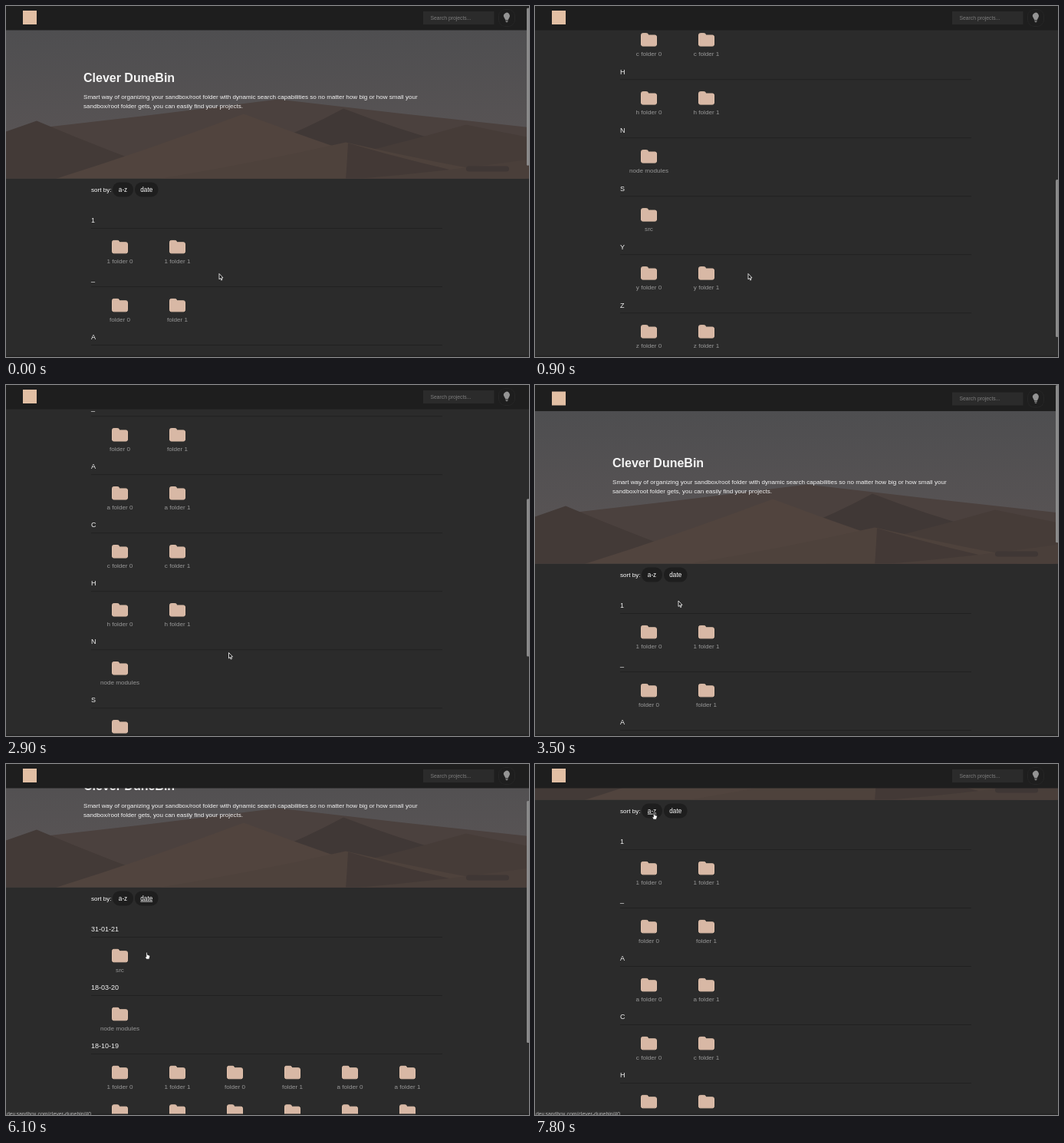
Recreate the animation shown at these times as an HTML page with a canvas. Size 682x457 px, loop 8 s.

```html
<!DOCTYPE html>
<html lang="en">
<head>
<meta charset="utf-8">
<title>Clever DuneBin</title>
<style>
html, body { margin: 0; width: 100%; height: 100%; overflow: hidden; background: #2b2b2b; }
canvas { display: block; width: 682px; height: 457px; }
</style>
</head>
<body>
<canvas id="stage"></canvas>
<script>
const W = 682, H = 457, LOOP = 8000, STEP = 100;
const FONT = '"Liberation Sans", Arial, sans-serif';
const LIGHT = '#f4f4f4', DARK = '#1e1e1e';
const canvas = document.getElementById('stage');
const ctx = canvas.getContext('2d');
const dpr = window.devicePixelRatio || 1;
canvas.width = W * dpr;
canvas.height = H * dpr;

const pair = name => [name + ' 0', name + ' 1'];
const letter = c => [c, pair(c.toLowerCase() + ' folder')];
const byName = [
  letter('1'), ['_', pair('folder')], ...['A', 'C', 'H'].map(letter),
  ['N', ['node modules']], ['S', ['src']], ...['Y', 'Z'].map(letter)
];
const byDate = [
  ['31-01-21', ['src']], ['18-03-20', ['node modules']],
  ['18-10-19', byName.flatMap(s => s[1]).filter(n => n.includes('folder'))]
];

const within = (t, a, b) => t >= a && t < b;
const unit = (t, start, dur) => Math.min(1, Math.max(0, (t - start) / dur));

// Progress from 0 to 1, slow at both ends
function ease(t, start, dur) {
  const u = unit(t, start, dur);
  return u * u * (3 - 2 * u);
}

// Elastic overscroll that swings out and returns
const bounce = (t, start, size) => size * Math.sin(Math.PI * unit(t, start, 600));

function scrollAt(t) {
  return 5.5 + 555.5 * ease(t, 0, 1125) + bounce(t, 1125, 8)
    - 561 * ease(t, 2700, 454) - bounce(t, 3154, 2.6)
    + 183.5 * ease(t, 5884, 516);
}

function pointerAt(t) {
  let x = 278, y = 348.5;
  const glide = (end, dur, tx, ty) => {
    const k = ease(t, end - dur, dur);
    x += (tx - x) * k;
    y += (ty - y) * k;
  };
  glide(1700, 600, 290.5, 348.5);
  glide(3500, 600, 187, 281);
  glide(4400, 600, 152, 244);
  glide(4900, 300, 174.5, 247);
  glide(5400, 400, 183.5, 245);
  glide(6400, 100, 171, 246);
  glide(6600, 100, 120, 64);
  glide(7400, 500, 155, 63);
  return [x, y];
}

function text(str, x, y, size, color, align = 'left', weight = 'normal') {
  ctx.font = `${weight} ${size}px ${FONT}`;
  ctx.fillStyle = color;
  ctx.textAlign = align;
  ctx.fillText(str, x, y);
}

function rect(x, y, w, h, color) {
  ctx.fillStyle = color;
  ctx.fillRect(x, y, w, h);
}

function pill(x, y, w, h, r, color) {
  ctx.beginPath();
  ctx.roundRect(x, y, w, h, r);
  ctx.fillStyle = color;
  ctx.fill();
}

// A crest with two gently sagging slopes
function dune(color, left, x, y, right, foot = 232) {
  const sag = (y + foot) / 2 + 4;
  ctx.beginPath();
  ctx.moveTo(left, foot);
  ctx.quadraticCurveTo((left + x) / 2, sag, x, y);
  ctx.quadraticCurveTo((x + right) / 2, sag, right, foot);
  ctx.lineTo(right, 232);
  ctx.lineTo(left, 232);
  ctx.fillStyle = color;
  ctx.fill();
}

function hero() {
  ctx.save();
  ctx.beginPath();
  ctx.rect(0, 31, W, 199);
  ctx.clip();
  const sky = ctx.createLinearGradient(0, 31, 0, 165);
  sky.addColorStop(0, '#4e4e50');
  sky.addColorStop(1, '#575354');
  rect(0, 31, W, 199, sky);
  dune('#4b413e', -200, 355, 127, 950, 190);
  dune('#403836', 340, 440, 139, 580, 185);
  dune('#433a37', -200, 40, 155, 240);
  dune('#51443e', 60, 310, 146, 560);
  dune('#463c38', 380, 600, 160, 900, 215);
  dune('#4e423c', 190, 443, 183, 690);
  dune('#433936', 443, 446, 184, 640);
  dune('#4a3f3a', 440, 690, 204, 900);
  pill(600, 214, 56, 7, 3.5, '#3f3735');
  ctx.restore();
  text('Clever DuneBin', 101, 104, 16, LIGHT, 'left', 'bold');
  text('Smart way of organizing your sandbox/root folder with dynamic search capabilities so no matter how big or how small your', 101, 126.8, 8.07, LIGHT);
  text('sandbox/root folder gets, you can easily find your projects.', 101, 138.8, 8.07, LIGHT);
}

function button(label, x, w, underlined) {
  pill(x, 235, w, 19, 9, DARK);
  text(label, x + w / 2, 247.4, 8.15, '#fff', 'center');
  if (underlined) {
    const tw = ctx.measureText(label).width;
    rect(x + (w - tw) / 2, 248.2, tw, 0.8, '#fff');
  }
}

function folder(label, x, y) {
  ctx.beginPath();
  ctx.roundRect(x - 10, y - 8.8, 9, 8, 2);
  ctx.roundRect(x - 10, y - 6.4, 20, 14, 2);
  ctx.strokeStyle = '#eacab2';
  ctx.lineWidth = 1;
  ctx.stroke();
  ctx.fillStyle = '#d8b8a5';
  ctx.fill();
  text(label, x, y + 21, 8.12, '#979797', 'center');
}

function list(sections) {
  sections.forEach(([title, names], i) => {
    const y = 284.5 + i * 76;
    text(title, 111, y + 3.3, 9, LIGHT);
    rect(111, y + 10.2, 458, 0.7, DARK);
    names.forEach((n, j) => folder(n, 148.5 + j % 6 * 75, y + 35.2 + Math.floor(j / 6) * 50.5));
  });
}

function bulb(x, y, color) {
  ctx.beginPath();
  ctx.arc(x, y, 4, Math.PI * 0.82, Math.PI * 0.18);
  ctx.lineTo(x + 1.8, y + 5.2);
  ctx.lineTo(x - 1.8, y + 5.2);
  ctx.fillStyle = color;
  ctx.fill();
  rect(x - 1.8, y + 5.8, 3.6, 1, color);
  rect(x - 1.2, y + 7.4, 2.4, 1, color);
}

function header() {
  rect(0, -20, W, 51.5, DARK);
  rect(22, 6, 18, 18, '#e2bfa4');
  rect(544, 7, 92.5, 17, '#2b2b2b');
  text('Search projects...', 553.5, 17.9, 6.8, '#7d7d7d');
  pill(642, 4, 22, 23, 9, '#262626');
  pill(643, 5, 20, 21, 8, DARK);
  bulb(653, 12.8, '#949494');
}

function outline(pts, fill, stroke) {
  ctx.beginPath();
  for (let i = 0; i < pts.length; i += 2) ctx.lineTo(pts[i], pts[i + 1]);
  ctx.closePath();
  ctx.lineJoin = 'round';
  ctx.lineWidth = 0.9;
  ctx.fillStyle = fill;
  ctx.strokeStyle = stroke;
  ctx.fill();
  ctx.stroke();
}

function pointer([x, y], hand) {
  ctx.save();
  ctx.translate(x, y);
  if (hand) {
    outline([-0.8, 0, 0.8, 0, 1, 3.2, 4.6, 4.6, 3.4, 9.2, -0.6, 9.2, -2.8, 5.6, -0.7, 6.2], '#fff', '#1a1a1a');
  } else {
    outline([0, 0, 0, 7.4, 1.6, 5.9, 2.7, 8.5, 3.9, 8, 2.8, 5.5, 5, 5.4], '#111', '#eee');
  }
  ctx.restore();
}

function scrollbar(scroll, pageH) {
  const top = Math.min(pageH - H, Math.max(0, scroll)) * H / pageH;
  pill(679, top, 3.5, H * H / pageH, 1.5, '#8a8a8a');
}

function draw(t) {
  const scroll = scrollAt(t);
  const dated = within(t, 5100, 7800);
  const pageH = dated ? 663 : 1018;
  const over = Math.max(0, -scroll) - Math.max(0, scroll - (pageH - H));
  const linked = within(t, 4300, 6400) || t >= 7100;

  ctx.setTransform(dpr, 0, 0, dpr, 0, 0);
  rect(0, 0, W, H, '#2b2b2b');

  ctx.save();
  ctx.translate(0, -scroll);
  hero();
  text('sort by:', 111, 247.4, 8.08, '#fff');
  button('a-z', 139, 27, within(t, 4300, 5000) || t >= 7100);
  button('date', 168, 30.5, within(t, 4800, 7600));
  list(dated ? byDate : byName);
  ctx.restore();

  ctx.save();
  ctx.translate(0, over);
  header();
  ctx.restore();

  rect(0, 455.5, W, 1.5, '#232323');
  if (linked) {
    pill(-4, 451.5, 111, 12, 2, '#303030');
    text('dev.sandbox.com/clever-dunebin/#0', 1, 458, 6.9, '#b5b5b5');
  }
  if (t < 1900 || within(t, 2800, 4300) || within(t, 5900, 7000)) scrollbar(scroll, pageH);
  pointer(pointerAt(t), linked);
}

let start;
function frame(now) {
  start ??= now;
  // The screen updates ten times a second
  draw(Math.floor((now - start) % LOOP / STEP) * STEP);
  requestAnimationFrame(frame);
}
requestAnimationFrame(frame);
</script>
</body>
</html>
```
